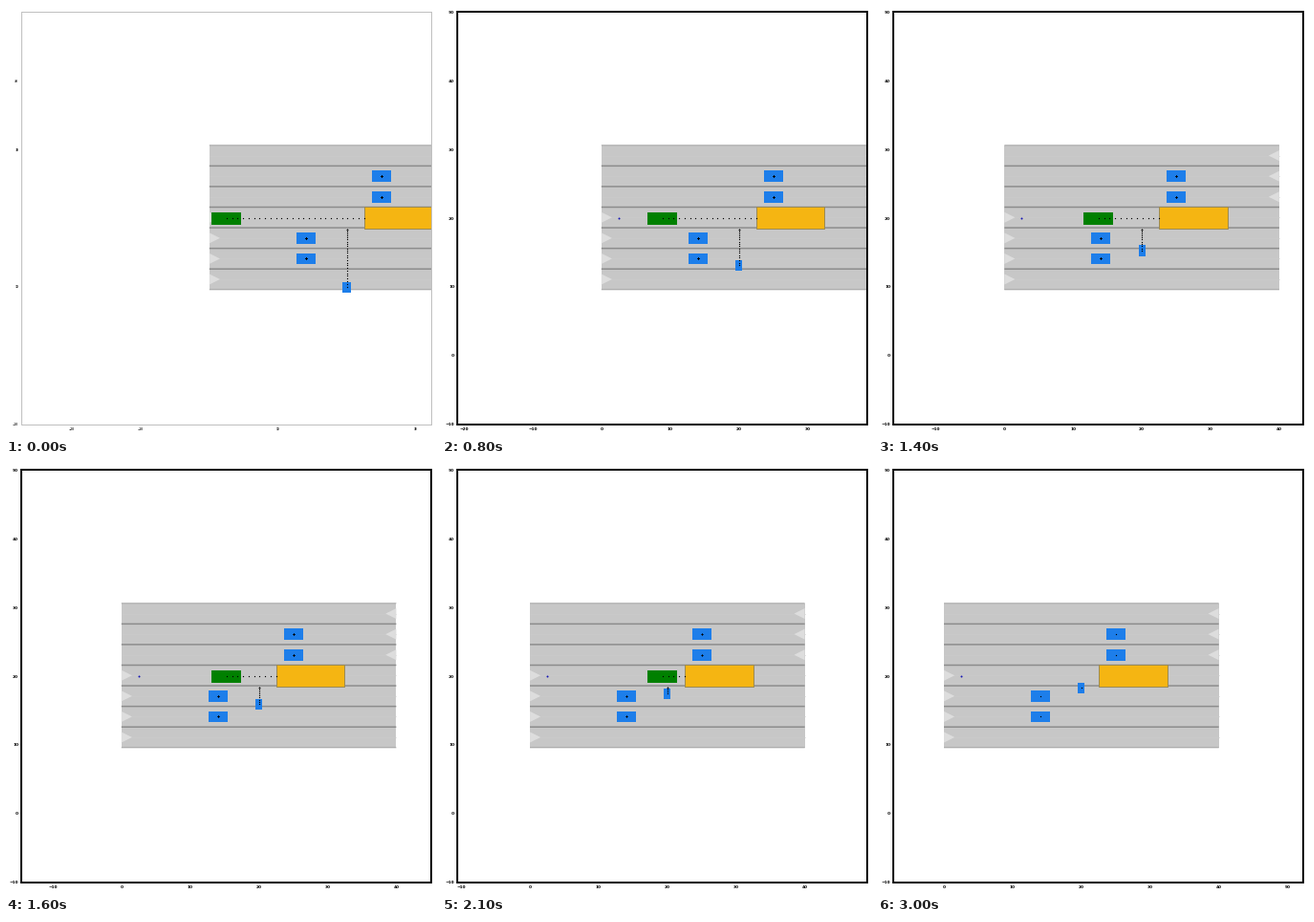
Animation of 450 by 450 pixels, one loop 3.1 s. Source, as a matplotlib script:

```python
import numpy as np
import matplotlib.pyplot as plt
from matplotlib.animation import FuncAnimation
from matplotlib.patches import Polygon, Rectangle
from matplotlib.ticker import FuncFormatter, MultipleLocator

STAGE, DPI = 450, 100
PX = 72 / DPI                    # one pixel in points
SCALE = 7.19                     # pixels per metre
LEFT, RIGHT, TOP, BOTTOM = 16, 445, 6, 438
VIEW_X, VIEW_Y, EGO_Y = 230.8, 222, 20

STEPS, EGO_END = 31, 25
LANE, LANES, ROAD_Y, ROAD_LEN = 3, 7, 9.6, 40
BLUE = "#1d7eea"
PARKED = [(25.05, 26.09), (25.05, 23.09), (14.05, 17.09), (14.05, 14.09)]

plt.rcParams["font.family"] = "DejaVu Sans"
plt.rcParams["font.weight"] = "bold"

fig = plt.figure(figsize=(STAGE / DPI, STAGE / DPI), dpi=DPI, facecolor="white")
ax = fig.add_axes([LEFT / STAGE, 1 - BOTTOM / STAGE,
                   (RIGHT - LEFT) / STAGE, (BOTTOM - TOP) / STAGE])


def ego_x(k):
    return 2.5 + 0.8 * np.minimum(k, EGO_END)


def walker_y(k):
    k = np.minimum(k, 24)
    return 9.92 + np.minimum(3.1 * k - 0.0247 * k**2, 60) / SCALE


def box(x, y, w, h, color, z=3, **style):
    ax.add_patch(Rectangle((x - w / 2, y - h / 2), w, h, fc=color, zorder=z, **style))


def dots(xs, ys, color="black", size=1.3, z=6):
    ax.plot(xs, ys, "o", color=color, ms=size * PX, mew=0, zorder=z, snap=False)


def draw_road():
    top = ROAD_Y + LANE * LANES
    box(ROAD_LEN / 2, (ROAD_Y + top) / 2, ROAD_LEN, top - ROAD_Y, "#c7c7c7", z=1, lw=0)
    for i in range(LANES + 1):
        y = ROAD_Y + LANE * i
        outer = i in (0, LANES)
        ax.plot([0, ROAD_LEN], [y, y], color="#a4a4a4" if outer else "#8c8c8c",
                lw=(1 if outer else 1.5) * PX, solid_capstyle="butt",
                snap=False, zorder=2)
    for i in range(LANES):
        y = ROAD_Y + LANE * (i + 0.5)
        ax.plot([0, ROAD_LEN], [y, y], color="#cbcbcb", lw=0.6 * PX, zorder=1.5)
        base, tip = (0, 1.55) if i < 4 else (ROAD_LEN, ROAD_LEN - 1.55)
        ax.add_patch(Polygon([(base, y - 0.77), (base, y + 0.77), (tip, y)],
                             fc="#dddddd", lw=0, zorder=2))


def style_axes(k):
    first = k == 0
    cam = ego_x(k)
    ax.set_xlim(cam - (VIEW_X - LEFT) / SCALE, cam + (RIGHT - VIEW_X) / SCALE)
    ax.set_ylim(EGO_Y - (BOTTOM - VIEW_Y) / SCALE, EGO_Y + (VIEW_Y - TOP) / SCALE)
    hidden = (0, 20, 50) if first else ()
    for axis in (ax.xaxis, ax.yaxis):
        axis.set_major_locator(MultipleLocator(10))
        axis.set_major_formatter(FuncFormatter(
            lambda v, _: "" if round(v) in hidden else f"{v:.0f}".replace("-", "\u2212")))
    ax.tick_params(length=0, labelsize=(2.8 if first else 4.2) * PX,
                   labelcolor="#333333" if first else "black")
    ax.tick_params(axis="x", pad=2.6 * PX)
    ax.tick_params(axis="y", pad=2.9 * PX)
    for spine in ax.spines.values():
        spine.set_linewidth((1 if first else 2) * PX)
        spine.set_edgecolor("#c0c0c0" if first else "black")


def draw(k):
    ax.cla()
    style_axes(k)
    draw_road()
    box(27.5, 20.05, 10, 3.1, "#f5b512", ec="#9c8a52", lw=PX)
    dots([2.5], [EGO_Y], "#1414b4", 2, z=3)

    ahead = np.arange(k, STEPS)
    for x, y in PARKED:
        box(x, y, 2.8, 1.66, BLUE, lw=0)
        dots(np.full(len(ahead), x), np.full(len(ahead), y))

    box(20, walker_y(k), 1.15 if k == 0 else 1.0, 1.58, BLUE, lw=0)
    dots(np.full(len(ahead), 20), walker_y(ahead))

    if k <= EGO_END:
        box(ego_x(k), EGO_Y - 0.06, 4.3, 1.8, "#008000", z=4, lw=0)
        route = np.arange(k, EGO_END + 1)
        dots(ego_x(route), np.full(len(route), EGO_Y))
    return []


anim = FuncAnimation(fig, draw, frames=STEPS, interval=100, init_func=lambda: [],
                     repeat=True, repeat_delay=0, blit=False)
plt.show()
```
